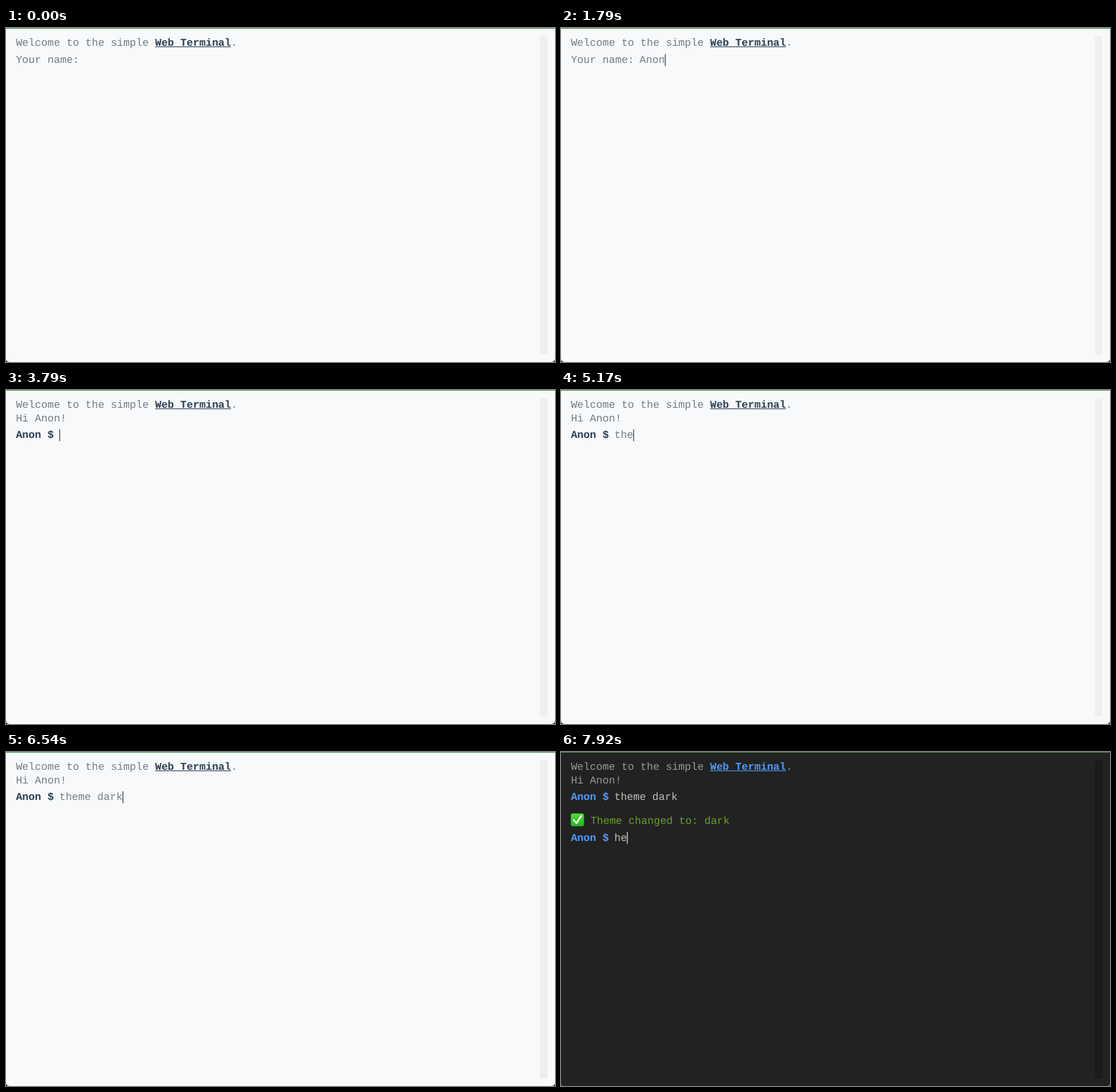
Animation, 800 px wide and 488 px high, one loop 8 s. Source, as an HTML page:

```html
<!DOCTYPE html>
<html lang="en">
<head>
<meta charset="utf-8">
<title>Web Terminal</title>
<style>
  html, body { margin: 0; width: 100%; height: 100%; overflow: hidden; }
  svg {
    --behind: #3a3d40; --panel: #f7f9fb; --track: #eef0f0; --edge: #4a8f50;
    --text: #707b84; --input: #727f89; --accent: #2c3e50; --caret: #1c1c1c;
    display: block; width: 800px; height: 488px; background: var(--behind);
    font: 15.36px "Liberation Mono", monospace;
  }
  svg.dark {
    --behind: #505050; --panel: #222; --track: #1b1b1b; --edge: #4d8052;
    --text: #9a9a9a; --input: #c0c0c0; --accent: #4f9cf9; --caret: #fff;
  }
  text { fill: var(--text); white-space: pre; text-rendering: geometricPrecision; }
  .accent { fill: var(--accent); font-weight: bold; }
  .input { fill: var(--input); }
  .success { fill: #6c9e2c; }
</style>
</head>
<body>
<svg id="terminal" viewBox="0 0 800 488">
  <defs>
    <linearGradient id="badge" x2="0" y2="1">
      <stop stop-color="#50d83a"/>
      <stop offset="1" stop-color="#1cbc18"/>
    </linearGradient>
  </defs>
  <path d="M0 0H800V483a5 5 0 0 1-5 5H5a5 5 0 0 1-5-5Z" fill="var(--panel)"/>
  <rect width="800" height="1" fill="var(--edge)"/>
  <rect x="778" y="12" width="11" height="465" fill="var(--track)"/>

  <text x="14.4" y="26.2">Welcome to the simple <tspan class="accent">Web Terminal</tspan>.</text>
  <rect x="217.3" y="27" width="110.6" height="1" fill="var(--accent)"/>
  <text id="question" x="14.4" y="51.2">Your name:</text>
  <g id="greeting">
    <text x="14.4" y="45.6">Hi Anon!</text>
    <text class="accent" x="14.4" y="70.3">Anon $</text>
  </g>
  <g id="result">
    <rect x="14.3" y="89.8" width="19.2" height="18.8" rx="3" fill="url(#badge)"/>
    <path d="M18.5 99.5l4 4.5 7-10.5" fill="none" stroke="#fff" stroke-width="2.4" stroke-linecap="round" stroke-linejoin="round"/>
    <text class="success" x="43" y="105.3">Theme changed to: dark</text>
    <text class="accent" x="14.4" y="130">Anon $</text>
  </g>
  <text id="name" class="input" x="114.6" y="51.2"></text>
  <text id="command" class="input" x="77.7" y="70.3"></text>
  <text id="next" class="input" x="77.7" y="130"></text>
  <rect id="caret" width="1" height="17.4" fill="var(--caret)"/>
</svg>
<script>
const LOOP = 8000, CHAR = 9.218, BLINK = 500;
const GREETED = 2420, THEMED = 6960;
const $ = id => document.getElementById(id);

const fields = [
  { id: 'name', start: 0, x: 114.6, y: 38.3, value: 'Anon',
    keys: [1210, 1420, 1580, 1790] },
  { id: 'command', start: GREETED, x: 77.7, y: 57.3, value: 'theme dark',
    keys: [5000, 5080, 5170, 5330, 5500, 6000, 6120, 6250, 6420, 6540] },
  { id: 'next', start: THEMED, x: 77.7, y: 117, value: 'he',
    keys: [7750, 7920] },
];

const show = (id, on) => $(id).setAttribute('visibility', on ? 'visible' : 'hidden');

function draw(t) {
  let active, lastKey = -830;
  for (const field of fields) {
    const typed = field.keys.filter(key => key <= t);
    field.count = typed.length;
    $(field.id).textContent = field.value.slice(0, field.count);
    if (typed.length) lastKey = typed.at(-1);
    if (t >= field.start) active = field;
  }

  $('terminal').classList.toggle('dark', t >= THEMED);
  show('question', t < GREETED);
  show('name', t < GREETED);
  show('greeting', t >= GREETED);
  show('result', t >= THEMED);

  // Every keystroke restarts the blink; pressing Enter does not.
  show('caret', (t - lastKey) % (2 * BLINK) < BLINK);
  $('caret').setAttribute('x', active.x + active.count * CHAR);
  $('caret').setAttribute('y', active.y);
}

const began = performance.now();
function tick() {
  draw((performance.now() - began) % LOOP);
  requestAnimationFrame(tick);
}
tick();
</script>
</body>
</html>
```
